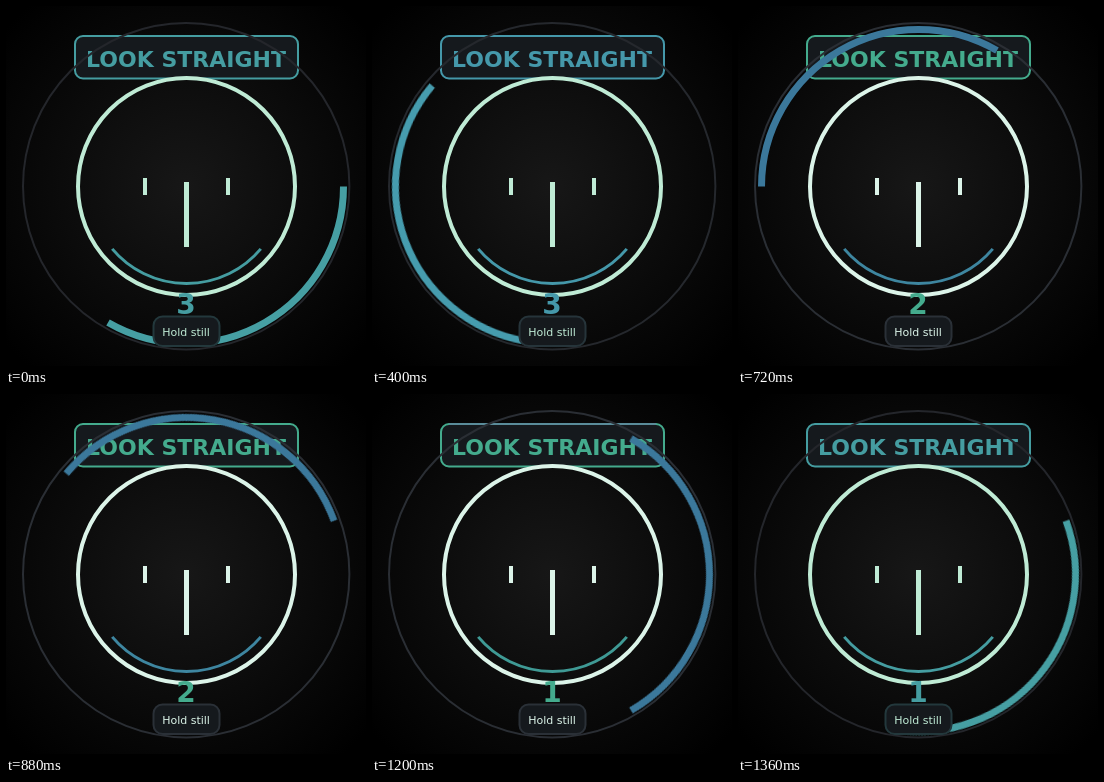
Animation, 360 px wide and 360 px high, one loop 1440 ms. Source, as an HTML page:

```html
<!DOCTYPE html>
<html lang="en">
<head>
<meta charset="utf-8">
<title>Look straight</title>
<style>
  html, body { margin: 0; width: 100%; height: 100%; overflow: hidden; background: #000; }
  svg { display: block; width: 100vw; height: 100vh; animation: mood 1440ms step-end infinite; }
  text { text-anchor: middle; font-family: "DejaVu Sans", sans-serif; }
  .line { fill: none; }
  .panel { fill: #15191d; stroke-width: 2; }
  .face { stroke: var(--face); }
  .bold { fill: var(--ink); font-weight: bold; }
  .track { stroke: var(--track); stroke-width: 2; }

  .sweep { stroke: var(--arc); stroke-width: 7; transform-origin: 180.5px 180.5px;
    animation: spin 1440ms steps(18) infinite; }
  .digit { font-size: 28px; opacity: 0; animation: count 1440ms step-end infinite; }
  .two { animation-delay: -960ms; }
  .one { animation-delay: -480ms; }

  @keyframes spin { to { transform: rotate(360deg); } }
  @keyframes count { 0% { opacity: 1; } 33.333%, 100% { opacity: 0; } }
  @keyframes mood {
    0%, 88.888%, 100% { --ink: #459da1; --top: #459da1; --arc: #469fa3; --mouth: #459da1;
      --face: #bfebd5; --track: #24262b; --rim: #23383c; }
    16.666% { --ink: #4598aa; --top: #4598aa; --arc: #469cae; --mouth: #4598aa;
      --face: #bfebd5; --track: #25282d; --rim: #26343a; }
    33.333%, 83.333% { --ink: #44ab8d; --top: #5a8c9a; --arc: #3b789b; --mouth: #3f9a95;
      --face: #dcf4e9; --track: #2a2e34; --rim: #2a3037; }
    38.888% { --ink: #44ab8d; --top: #44ab8d; --arc: #3b789b; --mouth: #3e86a0;
      --face: #dcf4e9; --track: #2a2e34; --rim: #2a3037; }
  }
</style>
</head>
<body>
<svg viewBox="0 0 360 360">
  <defs>
    <radialGradient id="glow" gradientUnits="userSpaceOnUse" cx="180" cy="180" r="240">
      <stop offset="0" stop-color="#171717"/>
      <stop offset="1" stop-color="#000"/>
    </radialGradient>
  </defs>
  <rect width="360" height="360" fill="url(#glow)"/>

  <rect class="panel" x="69" y="30" width="223" height="42.5" rx="8" stroke="var(--ink)"/>
  <path class="line" d="M77 30H284" stroke="var(--top)" stroke-width="2"/>
  <text class="bold" x="180" y="61" font-size="22">LOOK STRAIGHT</text>

  <circle class="line track" cx="180.2" cy="180.2" r="163.2"/>
  <path class="line sweep" d="M337.5 180.5A157 157 0 0 1 102 316.47"/>

  <circle class="line face" cx="180.5" cy="180.5" r="108.5" stroke-width="4"/>
  <path class="line face" d="M139 172V189M222 172V189" stroke-width="4"/>
  <path class="line face" d="M180.5 176V241" stroke-width="5"/>
  <path class="line" d="M254.8 242.85A97 97 0 0 1 106.2 242.85" stroke="var(--mouth)" stroke-width="3"/>

  <text class="bold digit" x="180" y="308">3</text>
  <text class="bold digit two" x="180" y="308">2</text>
  <text class="bold digit one" x="180" y="308">1</text>

  <rect class="panel" x="147.5" y="310.5" width="66" height="29.5" rx="9" stroke="var(--rim)"/>
  <text x="180" y="330" font-size="11" fill="var(--face)">Hold still</text>
</svg>
</body>
</html>
```
